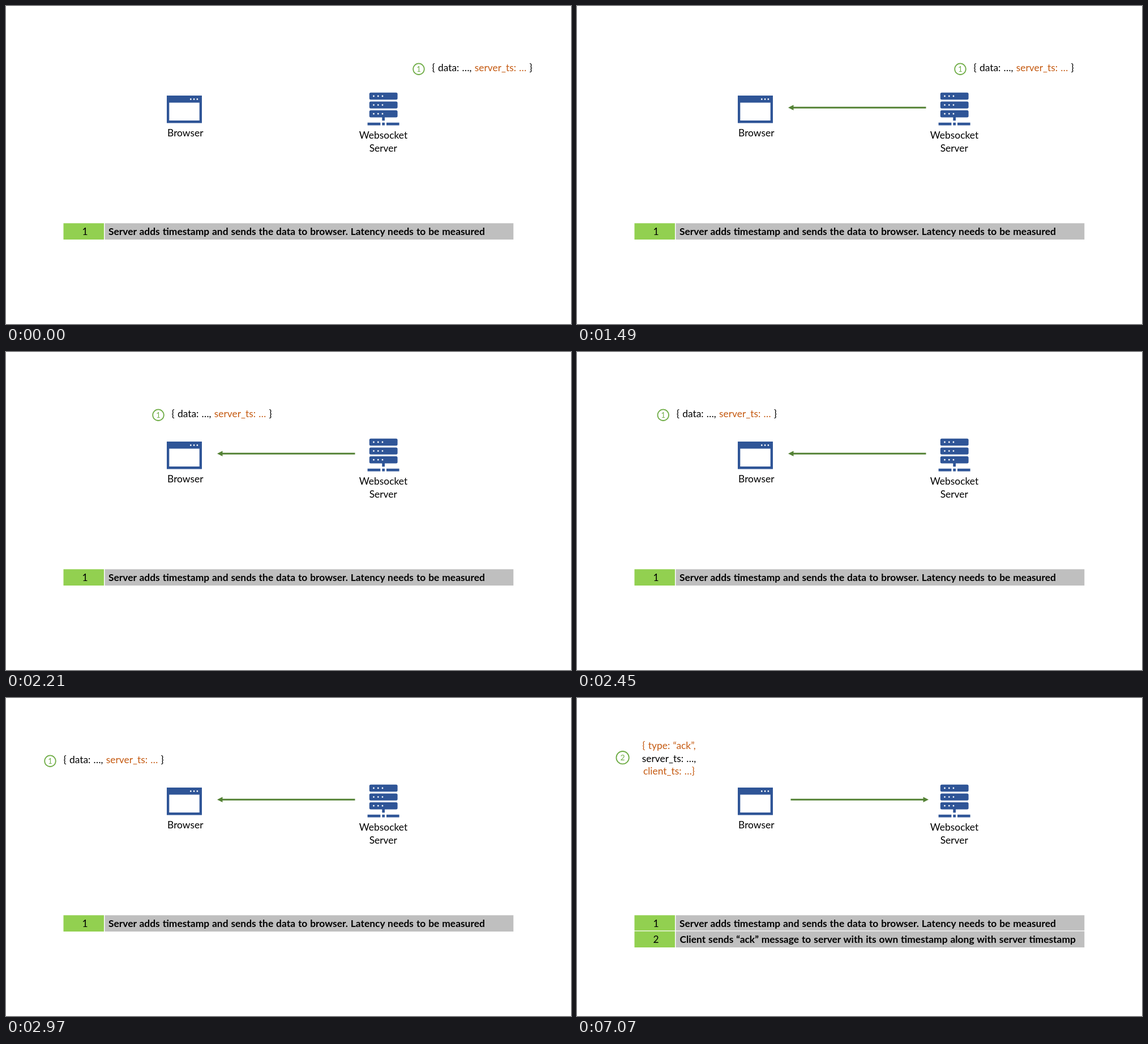
An HTML page for the animation above (8000 ms loop, 998 px wide and 561 px high).

```html
<!DOCTYPE html>
<html lang="en">
<head>
<meta charset="utf-8">
<title>Latency measurement</title>
<style>
html, body { margin: 0; width: 100%; height: 100%; overflow: hidden; background: #fff; }
svg { display: block; width: 998px; height: 561px; }
text { font: 17.4px Lato, Carlito, sans-serif; word-spacing: .7px; white-space: pre; }
.mid { text-anchor: middle; }
.bold { font-weight: bold; }
.new { fill: #c55a11; }
.badge circle { fill: none; stroke: #70ad47; stroke-width: 1.8; }
.badge text { fill: #70ad47; text-anchor: middle; font-size: 13px; }
.icon { fill: #2f5597; }
.dots { fill: none; stroke: #fff; stroke-width: 2.8; stroke-linecap: round; }
.arrow { fill: #548235; }
</style>
</head>
<body>
<svg viewBox="0 0 998 561">
  <defs>
    <path id="arrow" d="M0 0 9.5-4.8V-1.5H243.5V1.5H9.5V4.8Z"/>
    <g id="unit">
      <rect x="641.8" width="49.8" height="12.4" rx="2.5"/>
      <path class="dots" d="M649.5 6.2h.01M657.3 6.2h.01M665 6.2h.01"/>
    </g>
  </defs>

  <g class="icon">
    <path fill-rule="evenodd" d="M284 158h62v48.6h-62ZM288.3 170.5v31.5h53.4v-31.5Z"/>
    <path class="dots" d="M326.3 164.4h.01M332.1 164.4h.01M337.9 164.4h.01"/>
    <use href="#unit" y="152.8"/>
    <use href="#unit" y="168.4"/>
    <use href="#unit" y="184"/>
    <path d="M664.3 196h4.7v6.2h-4.7ZM638.6 205.8h22.8v4.6h-22.8ZM664.3 205.8h4.7v4.6h-4.7ZM672 205.8h22.6v4.6H672Z"/>
  </g>
  <text class="mid" x="316.8" y="230">Browser</text>
  <text class="mid" x="666.5" y="234">Websocket</text>
  <text class="mid" x="666.3" y="256.5">Server</text>

  <path fill="#92d050" d="M101.5 383.2H173V412H101.5Z"/>
  <path fill="#bfbfbf" d="M174.5 383.2H896.3V412H174.5Z"/>
  <text class="mid" x="139.5" y="404">1</text>
  <text class="bold" x="181" y="404">Server adds timestamp and sends the data to browser. Latency needs to be measured</text>

  <g id="message">
    <g class="badge"><circle cx="729" cy="111.2" r="9.8"/><text x="729" y="115.9">1</text></g>
    <text x="752.5" y="115">{ data: …, <tspan class="new">server_ts: …</tspan> }</text>
  </g>
  <use id="down" class="arrow" href="#arrow" x="373" y="179.3"/>

  <g id="reply">
    <path fill="#fff" d="M101 410.2H897V412.2H101Z"/>
    <path fill="#92d050" d="M101.5 411.5H173V440H101.5Z"/>
    <path fill="#bfbfbf" d="M174.5 411.5H896.3V440H174.5Z"/>
    <text class="mid" x="139.5" y="432">2</text>
    <text class="bold" x="181.5" y="432">Client sends “ack” message to server with its own timestamp along with server timestamp</text>
    <g class="badge"><circle cx="80.6" cy="105.2" r="11.2"/><text x="80.6" y="110.2" style="font-size:14px">2</text></g>
    <text class="mid new" x="162.5" y="90">{ type: “ack”,</text>
    <text class="mid" x="162.5" y="112.5">server_ts: …,</text>
    <text class="mid new" x="162.5" y="135">client_ts: …}</text>
  </g>
  <use id="up" class="arrow" href="#arrow" transform="translate(621 179.3) scale(-1 1)"/>
</svg>
<script>
const LOOP = 8000, START = 1050, REPLY = 6070, UP = 7070, STEP = 40;
// time, distance travelled, speed
const path = [[1050, 0, 0], [1490, 52, .31], [1850, 226, .62], [2210, 460, .6], [2730, 643, .1], [2970, 651, 0]];
const [message, down, reply, up] = ['message', 'down', 'reply', 'up'].map(id => document.getElementById(id));

function travel(t) {
  if (t <= START) return 0;
  const i = path.findIndex(p => p[0] > t);
  if (i < 0) return path.at(-1)[1];
  const [t0, x0, v0] = path[i - 1], [t1, x1, v1] = path[i];
  const h = t1 - t0, s = (t - t0) / h, r = 1 - s;
  return x0 * r * r * (1 + 2 * s) + x1 * s * s * (1 + 2 * r) + h * s * r * (v0 * r - v1 * s);
}

function show(el, on) {
  el.style.display = on ? '' : 'none';
}

function draw(now) {
  const t = now % LOOP;
  const stepped = START + Math.floor((t - START) / STEP) * STEP;
  message.setAttribute('transform', `translate(${-travel(stepped)} 0)`);
  show(message, t < REPLY);
  show(down, t >= START && t < REPLY);
  show(reply, t >= REPLY);
  show(up, t >= UP);
}

let begin;
function tick(now) {
  begin ??= now;
  draw(now - begin);
  requestAnimationFrame(tick);
}
draw(0);
requestAnimationFrame(tick);
</script>
</body>
</html>
```
